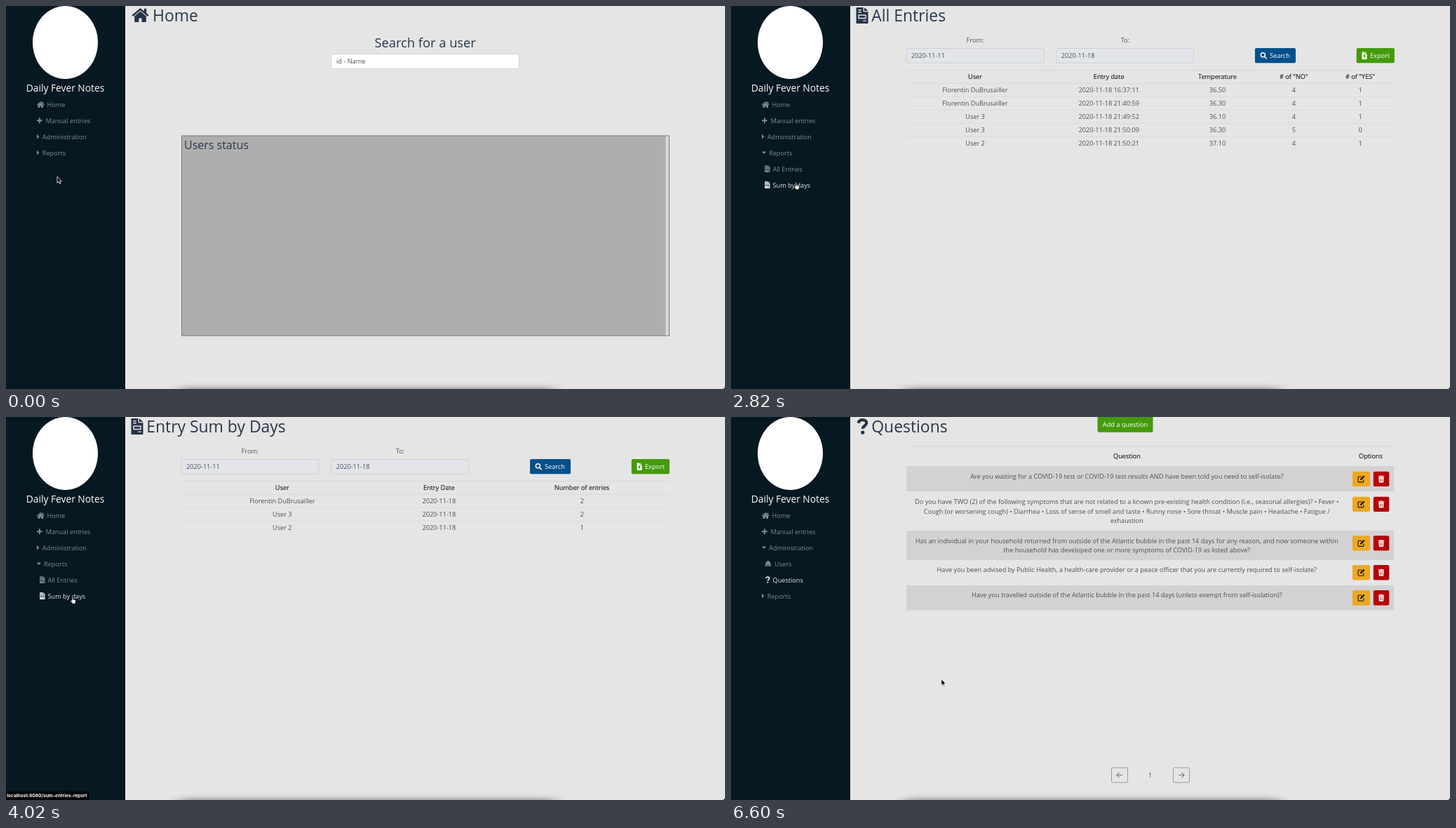
An HTML page for the animation above (6620 ms loop, 1025 by 546 pixels).

```html
<!DOCTYPE html>
<html lang="en">
<head>
<meta charset="utf-8">
<title>Daily Fever Notes</title>
<style>
html, body { margin: 0; width: 100%; height: 100%; overflow: hidden; background: #e5e5e5; }
svg { display: block; }
text { font: 9.16px "Open Sans", sans-serif; fill: #48515b; white-space: pre; }
.h { font-size: 22.9px; fill: #283749; }
.sub { font-size: 18.3px; fill: #283749; }
.th { fill: #1b232c; stroke: #1b232c; stroke-width: .15px; }
.w { fill: #fff; }
.mid { text-anchor: middle; }
.nav text, .nav { fill: #e9ecee; }
.status text { font: 700 6.6px Inter, sans-serif; fill: #fff; }
.line { stroke: #d6d8da; }
</style>
</head>
<body>
<svg id="stage" width="1025" height="546" viewBox="0 0 1025 546">
  <defs>
    <filter id="soft" x="-10%" y="-200%" width="120%" height="500%"><feGaussianBlur stdDeviation="10 4"/></filter>
    <g id="home">
      <path d="M1.2 11 12 2 22.8 11" fill="none" stroke="currentColor" stroke-width="2.5"/>
      <path d="M17.2 1.3h3.2V9l-3.2-2.7zM4 11.5 12 4.9l8 6.6V19q0 .8-.8.8H14v-5.4h-4v5.4H4.8Q4 19.8 4 19z" fill="currentColor"/>
    </g>
    <path id="file" fill="currentColor" fill-rule="evenodd" d="M1.2 0H10v5.2q0 1 1 1h6V21.8Q17 23 15.8 23H1.2Q0 23 0 21.8V1.2Q0 0 1.2 0zM11.4 0 17 5H11.4zM2.8 3v1.4h4.4V3zm0 3v1.4h4.4V6zm0 4.3v6h11.4v-6zm1.4 1.5h8.6v3H4.2zM9.8 18.4v1.4h4.4v-1.4z"/>
    <g id="ask">
      <path d="M2 6.8C3.2 3.5 5.6 2.3 8.3 2.3c3.6 0 5.6 2.1 5.6 4.5 0 4-5.4 3.8-5.4 8.2" fill="none" stroke="currentColor" stroke-width="4.2"/>
      <circle cx="8.4" cy="20.3" r="2.6" fill="currentColor"/>
    </g>
    <path id="dome" fill="currentColor" d="M1 6.3C1 3 2.6 1.2 4 1V0h2v1c1.6.3 3 2 3 5.3zM0 6.9h10v1.4H0z"/>
    <g id="pen" fill="none" stroke="#1c1606" stroke-width="1.1">
      <path d="M6 2H1.5Q.6 2 .6 2.9V9q0 .9.9.9h6q.9 0 .9-.9V6.3"/>
      <path d="M4 6.6 9.4 1.2" stroke-width="2.2"/>
    </g>
    <path id="bin" fill="#fff" fill-rule="evenodd" d="M0 .8h2.6L3 0h2.4l.4.8h2.6V2H0zM.6 2.6h7.2L7.4 9q0 1-1 1H2Q1 10 1 9zM2.4 4v4.6H3V4zm1.5 0v4.6h.6V4zm1.5 0v4.6H6V4z"/>
  </defs>
  <rect width="1025" height="546" fill="#e5e5e5"/>
  <g id="pages"></g>
  <rect x="248" y="545.5" width="534" height="14" fill="#333" opacity=".62" filter="url(#soft)"/>
  <rect width="170" height="546" fill="#061821"/>
  <ellipse cx="84.5" cy="52" rx="46.5" ry="52" fill="#fff"/>
  <text class="w mid" x="84.5" y="121.5" style="font-size:13.8px">Daily Fever Notes</text>
  <g id="menu" class="nav" color="#e9ecee"></g>
  <path d="M1025 541.5V546h-4.5q4.5 0 4.5-4.5z" fill="#222"/>
  <rect id="shade" width="1025" height="546"/>
  <g id="spin" fill="none" stroke="#111" stroke-width="5"><circle r="20"/></g>
  <g id="bars" class="status"></g>
  <g id="cursor">
    <path id="arrow" d="M0 0V9.2L2.1 7.3 3.5 10.6 5 10 3.6 6.8H6.4Z" fill="#000" stroke="#fff" stroke-width=".8"/>
    <path id="hand" transform="translate(-.2 .7) scale(1 1.05)" d="M-.8 5.8V1.2Q-.8.2 0 .2T.8 1.2V4.2L4 4.8Q4.8 5 4.6 6.2L4 10.2H.2L-2.7 6.6Q-3 5.6-2 5.4Z" fill="#fff" stroke="#000" stroke-width=".7"/>
  </g>
</svg>
<script>
const LOOP = 6620;
const $ = id => document.getElementById(id);
const clamp = v => Math.max(0, Math.min(1, v));
const smooth = v => v * v * (3 - 2 * v);
const within = (t, a, b) => t >= a && t < b;
const pulse = (t, a, b, d = 100) => clamp((t - a) / d) - clamp((t - b) / d);
const show = (el, on) => { el.style.display = on ? '' : 'none'; };

// Markup helpers
const text = (x, y, s, cls = '') => `<text x="${x}" y="${y}" class="${cls}">${s}</text>`;
const mid = (x, y, s, cls = '') => text(x, y, s, 'mid ' + cls);
const box = (x, y, w, h, fill, more = '') => `<rect x="${x}" y="${y}" width="${w}" height="${h}" fill="${fill}" ${more}/>`;
const icon = (id, x, y, k = 1) => `<use href="#${id}" transform="translate(${x} ${y}) scale(${k})"/>`;
const rule = (y, w = 1) => `<path class="line" d="M250 ${y}H946" stroke-width="${w}"/>`;
const group = (id, s) => `<g id="${id}">${s}</g>`;
const title = (id, x, y, k, tx, s) => `<g color="#253347">${icon(id, x, y, k)}</g>` + text(tx, 22.4, s, 'h');

const field = (x, s) => box(x + .5, 60.5, 196, 20.5, '#e3e5ea', 'rx="2" stroke="#cdd0d6"') + text(x + 7.5, 74, s);

const filters = mid(348, 51.7, 'From:') + mid(562, 51.7, 'To:') +
  field(249.5, '2020-11-11') + field(463.2, '2020-11-18') +
  box(747, 60, 58, 21.3, '#04508a', 'rx="2"') +
  '<g fill="none" stroke="#fff" stroke-width="1.5"><circle cx="758.3" cy="69.7" r="3"/><path d="m760.5 72 3.2 3.2"/></g>' +
  text(768, 73.9, 'Search', 'w') +
  box(891.7, 60, 54.2, 21.3, '#449a0c', 'rx="2"') +
  '<path fill="#fff" fill-rule="evenodd" d="M899.5 65.5h4v3h3v7.5h-7zM904.2 65.5l2.3 2.3h-2.3zM903 69l-2.2 2.4h1.4v2.4h1.6v-2.4h1.4z"/>' +
  text(911, 73.9, 'Export', 'w') + rule(91.5);

const cells = (cols, y, row, cls) => row.map((s, i) => mid(cols[i], y, s, cls)).join('');

function report(id, name, heads, empty, cols, rows) {
  return group(id, title('file', 178.5, 2, 1, 200.3, name) + filters + rule(110.2) +
    group(id + 'Empty', cells(empty, 103.7, heads, 'th')) +
    group(id + 'Full', cells(cols, 103.7, heads, 'th') + rows.map((r, i) =>
      cells(cols, 123.3 + i * 18.95, r) + (i ? rule(110.5 + i * 18.95, .7) : '')).join('')));
}

const person = 'Florentin DuBrusailler';
const day = '2020-11-18';

const homePage = group('pHome', title('home', 179, 2.5, 1.04, 209, 'Home') +
  mid(597.7, 58.7, 'Search for a user', 'sub') +
  box(463.5, 68.5, 268, 21, '#fff', 'rx="2" stroke="#ced4da"') + text(471, 82, 'id - Name') +
  box(250.5, 185, 695, 285, '#aeaeae', 'stroke="#777"') +
  box(940, 185.6, 5, 283.8, '#d8d8d8') + box(940, 185.6, .8, 283.8, '#c4c4c4') +
  '<text x="254" y="203.9" class="sub" style="font-size:16px">Users status</text>');

// Each question: top, height, button top, first baseline, lines
const questions = [
  [70, 36, 77.7, 88, 'Are you waiting for a COVID-19 test or COVID-19 test results AND have been told you need to self-isolate?'],
  [106, 56, 113.7, 124, 'Do you have TWO (2) of the following symptoms that are not related to a known pre-existing health condition (i.e., seasonal allergies)? • Fever •',
    'Cough (or worsening cough) • Diarrhea • Loss of sense of smell and taste • Runny nose • Sore throat • Muscle pain • Headache • Fatigue /', 'exhaustion'],
  [162, 42, 169.2, 179.6, 'Has an individual in your household returned from outside of the Atlantic bubble in the past 14 days for any reason, and now someone within',
    'the household has developed one or more symptoms of COVID-19 as listed above?'],
  [204, 36, 211, 221.4, 'Have you been advised by Public Health, a health-care provider or a peace officer that you are currently required to self-isolate?'],
  [240, 35.5, 247, 257.4, 'Have you travelled outside of the Atlantic bubble in the past 14 days (unless exempt from self-isolation)?']
];

const pager = (x, dir) => box(x, 500, 23, 21, 'none', 'rx="1.5" stroke="#9a9a9a"') +
  `<path d="M${x + 11.5 - 4 * dir} 510.5h${8 * dir}m${-3.6 * dir} -3.6l${3.6 * dir} 3.6l${-3.6 * dir} 3.6" fill="none" stroke="#777" stroke-width="1.1"/>`;

const questionPage = group('pAsk', title('ask', 179.3, 1.8, 1, 200.3, 'Questions') +
  box(522.5, -3, 79, 24.7, '#449a0c', 'rx="2"') + mid(562, 14.3, 'Add a question', 'w') +
  group('askFull', rule(41.5) + mid(564.5, 59, 'Question', 'th') + mid(912, 59, 'Options', 'th') +
    questions.map(([y, h, by, ty, ...lines], i) =>
      (i % 2 ? '' : box(250, y, 695, h, '#d2d2d2')) +
      lines.map((s, n) => mid(564.3, ty + n * 13.7, s)).join('') +
      box(886, by, 25, 21.4, '#eda824', 'rx="2"') + icon('pen', 893.4, by + 5.3) +
      box(915.8, by, 22.5, 21.4, '#b50306', 'rx="2"') + icon('bin', 922.8, by + 5.7)).join('') +
    pager(542.5, -1) + mid(597.7, 513.7, '1') + pager(630.5, 1)));

$('pages').innerHTML = homePage +
  report('pAll', 'All Entries', ['User', 'Entry date', 'Temperature', '# of "NO"', '# of "YES"'],
    [286, 397, 566.5, 731, 873], [348, 538.7, 693.5, 802.3, 897], [
      [person, day + ' 16:37:11', '36.50', 4, 1],
      [person, day + ' 21:40:59', '36.30', 4, 1],
      ['User 3', day + ' 21:49:52', '36.10', 4, 1],
      ['User 3', day + ' 21:50:09', '36.30', 5, 0],
      ['User 2', day + ' 21:50:21', '37.10', 4, 1]]) +
  report('pSum', 'Entry Sum by Days', ['User', 'Entry Date', 'Number of entries'],
    [305.5, 470.5, 762.5], [393.8, 617.3, 821], [
      [person, day, 2], ['User 3', day, 2], ['User 2', day, 1]]) +
  questionPage;

// Menu entries: y of the centre is 0 inside each group
const item = (id, art, x, s) => group(id, art + text(x, 3.6, s));
const right = '<path d="M44 -3.4 47.3 0 44 3.4z"/>';
const down = '<path d="M43.7 -1.6h6.4L46.9 1.8z"/>';
const page = icon('file', 48.2, -4.8, .43);
$('menu').innerHTML =
  item('mHome', icon('home', 43.6, -4.6, .47), 58.5, 'Home') +
  item('mAdd', '<path d="M44 -1h2.9v-3h1.9v3h2.9v1.9h-2.9v3h-1.9v-3H44z"/>', 56.5, 'Manual entries') +
  item('mAdm', right, 51.8, 'Administration') + item('mAdmOpen', down, 54, 'Administration') +
  item('mRep', right, 51.8, 'Reports') + item('mRepOpen', down, 54, 'Reports') +
  item('mAll', page, 59.5, 'All Entries') + item('mSum', page, 59.5, 'Sum by days') +
  item('mUsers', icon('dome', 48, -4.4, .98), 62, 'Users') +
  item('mAsk', icon('ask', 48.8, -4.8, .42), 59.5, 'Questions');

function place(id, on, row, glow = 0) {
  const el = $(id);
  show(el, on);
  el.setAttribute('transform', `translate(0 ${140.4 + 22.9 * row})`);
  el.setAttribute('opacity', .54 + .44 * glow);
}

// Link address, bar width, start, end
const bars = [
  ['#', 60, 200, 560], ['all-entries-report', 112, 1400, 1720],
  ['sum-entries-report', 118, 2970, 4200], ['#', 60, 4480, 5500], ['questions', 88, 5600, 6050]
];
$('bars').innerHTML = bars.map(([s, w]) =>
  `<g><path d="M0 534H${w - 2}q2 0 2 2V546H0z"/>${text(1.2, 542.4, 'localhost:8080/' + s)}</g>`).join('');

const path = [
  [0, 73, 243], [20, 73, 243], [270, 72, 210], [500, 72, 210], [720, 74, 211.5], [860, 74, 211.5],
  [1510, 84, 231.5], [2380, 84, 231.5], [2990, 95, 254.8], [4020, 95, 254.8], [4650, 72, 211],
  [4700, 72, 211], [5070, 72, 187], [5220, 72, 187], [5640, 75.3, 237.5], [5900, 75.3, 237.5],
  [6550, 299.8, 373.5], [LOOP, 299.8, 373.5]
];

function cursorAt(t) {
  const i = path.findIndex(p => p[0] > t);
  const [t0, x0, y0] = path[i - 1], [t1, x1, y1] = path[i];
  const k = smooth((t - t0) / (t1 - t0));
  return [x0 + (x1 - x0) * k, y0 + (y1 - y0) * k];
}

// Busy periods: start, data arrival, end of fade
const loads = [[1640, 1800, 1950], [3060, 3320, 3590]];

function drawLoad(t) {
  const load = loads.find(([a, , c]) => within(t, a, c));
  show($('shade'), load);
  show($('spin'), load);
  if (!load) return;
  const [a, b, c] = load, u = t - a;
  const fade = 1 - clamp((t - b) / (c - b));
  $('shade').setAttribute('opacity', .4 * clamp((u + 63) / 100) * fade);
  const p = u % 1500 / 1500;
  const grow = smooth(clamp(2 * p)), slide = smooth(clamp(2 * p - 1));
  const ring = $('spin').firstElementChild;
  ring.setAttribute('stroke-dasharray', `${3 + 86 * grow} 200`);
  ring.setAttribute('stroke-dashoffset', -35 * grow - 89 * slide);
  $('spin').setAttribute('transform', `translate(512.7 271) scale(.485) rotate(${u * .18})`);
  $('spin').setAttribute('opacity', fade);
}

function drawMenu(t) {
  const rep = within(t, 880, 4600), adm = t >= 5240;
  const admGlow = pulse(t, 4880, 5320), repGlow = pulse(t, 500, 1000) + pulse(t, 4480, 4760);
  place('mHome', true, 0);
  place('mAdd', true, 1);
  place('mAdm', !adm, 2, admGlow);
  place('mAdmOpen', adm, 2, admGlow);
  place('mUsers', adm, 3, pulse(t, 5380, 5500));
  place('mAsk', adm, 4, pulse(t, 5520, 9999));
  place('mRep', !rep, adm ? 5 : 3, repGlow);
  place('mRepOpen', rep, 3, repGlow);
  place('mAll', rep, 4, pulse(t, 1260, 2640) + pulse(t, 4220, 4400));
  place('mSum', rep, 5, pulse(t, 2680, 4180));
}

function draw(t) {
  show($('pHome'), t < 1640);
  show($('pAll'), within(t, 1640, 3060));
  show($('pSum'), within(t, 3060, 5740));
  show($('pAsk'), t >= 5740);
  show($('askFull'), t >= 5840);
  ['pAll', 'pSum'].forEach((id, i) => {
    const full = t >= loads[i][1];
    show($(id + 'Full'), full);
    show($(id + 'Empty'), !full);
  });
  drawMenu(t);
  drawLoad(t);
  bars.forEach(([, , a, b], i) => $('bars').children[i].setAttribute('opacity', pulse(t, a, b)));
  const [x, y] = cursorAt(t);
  $('cursor').setAttribute('transform', `translate(${x} ${y})`);
  const arrow = t < 220 || within(t, 1600, 1950) || within(t, 3040, 3590) || t >= 6000;
  show($('arrow'), arrow);
  show($('hand'), !arrow);
}

const start = performance.now();
function tick() {
  draw((performance.now() - start) % LOOP);
  requestAnimationFrame(tick);
}
tick();
</script>
</body>
</html>
```
